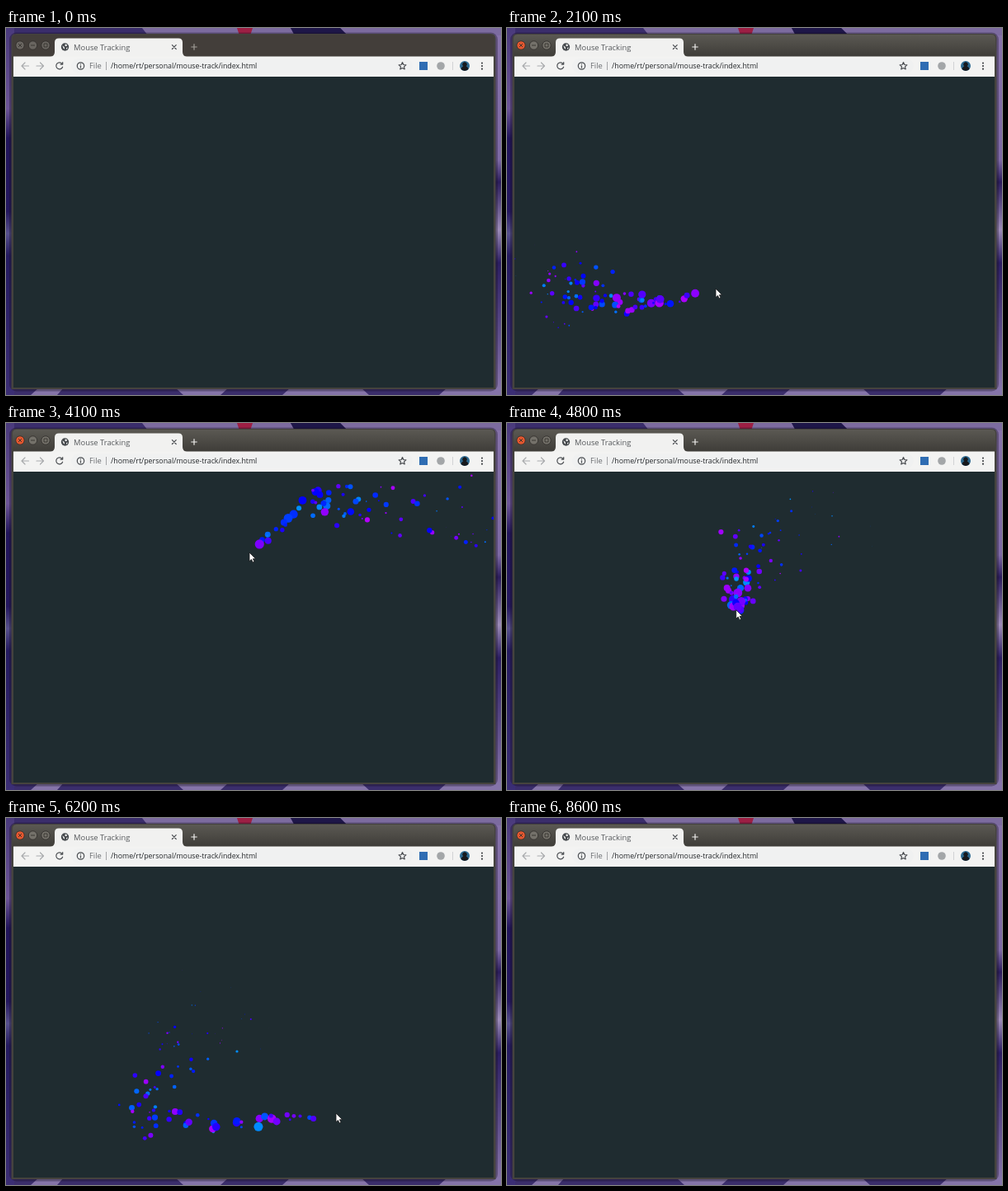
An HTML page for the animation above (8700 ms loop, 600x445 px).

```html
<!DOCTYPE html>
<html lang="en">
<head>
<meta charset="utf-8">
<title>Mouse Tracking</title>
<style>
  html, body { margin: 0; width: 100%; height: 100%; overflow: hidden; background: #3b2d69; }
  svg { display: block; width: 100vw; height: 100vh; }
  text { font-family: "Open Sans", "Noto Sans", sans-serif; }
  .icon { fill: none; stroke: #4b4e52; stroke-width: 1.2; stroke-linecap: round; stroke-linejoin: round; }
  .off { stroke: #a9abad; }
</style>
</head>
<body>
<svg viewBox="0 0 600 445">
  <defs>
    <linearGradient id="bar" x1="0" y1="0" x2="0" y2="1">
      <stop offset="0" stop-color="#5b5953"/>
      <stop offset="1" stop-color="#3e3c38"/>
    </linearGradient>
    <linearGradient id="left" x1="0" y1="0" x2="0" y2="1">
      <stop offset="0" stop-color="#4a3a7c"/>
      <stop offset=".22" stop-color="#6d5598"/>
      <stop offset=".3" stop-color="#21145b"/>
      <stop offset=".5" stop-color="#24175f"/>
      <stop offset=".56" stop-color="#57508d"/>
      <stop offset=".62" stop-color="#241a60"/>
      <stop offset="1" stop-color="#3b2e75"/>
    </linearGradient>
    <linearGradient id="right" x1="0" y1="0" x2="0" y2="1">
      <stop offset="0" stop-color="#8672a9"/>
      <stop offset=".36" stop-color="#7d69a4"/>
      <stop offset=".42" stop-color="#2b1c5c"/>
      <stop offset=".55" stop-color="#9c8bb8"/>
      <stop offset=".64" stop-color="#2b1d62"/>
      <stop offset="1" stop-color="#8a77ac"/>
    </linearGradient>
    <clipPath id="page"><rect x="9" y="59" width="582" height="377"/></clipPath>
  </defs>

  <!-- desktop -->
  <rect width="600" height="445" fill="#3a2d6b"/>
  <rect width="10" height="445" fill="url(#left)"/>
  <rect x="590" width="10" height="445" fill="url(#right)"/>
  <path d="M165 0H345L350 9H172ZM405 0H600V9H414Z" fill="#7c6b9f"/>
  <path d="M280 0H299L296 9H283Z" fill="#9d1f44"/>
  <path d="M345 0H405L414 9H350Z" fill="#1e1648"/>
  <path d="M30 445L40 436H70L62 445ZM205 436H270L260 445H215ZM345 436H430L440 445H335ZM535 436H600V445H525Z" fill="#8574a9"/>

  <!-- window -->
  <rect x="5.5" y="7" width="589" height="432" rx="7" fill="none" stroke="#14101f" stroke-opacity=".35" stroke-width="3"/>
  <path d="M6.5 438V13Q6.5 7 12.5 7H587.5Q593.5 7 593.5 13V438Z" fill="#45433e"/>
  <path id="title" d="M8 35V13Q8 8 13 8H587Q592 8 592 13V35Z"/>
  <g id="buttons" stroke="#2f2d2a" stroke-width=".8">
    <circle cx="17" cy="21" r="5.2"/>
    <circle cx="32.5" cy="21" r="5.2"/>
    <circle cx="48" cy="21" r="5.2"/>
  </g>
  <path d="M15 19l4 4m0-4l-4 4M30 21h5M46 19h4v4h-4z" fill="none" stroke="#34312d" stroke-width=".9"/>
  <path d="M54 35Q59 34 59 29V17.5Q59 12.5 64 12.5H209Q214 12.5 214 17.5V29Q214 34 219 35Z" fill="#f1f1f0"/>
  <circle cx="71.5" cy="23" r="4.7" fill="#45494d"/>
  <path d="M68.3 21.2l2.4 1.9 .4 2.7-1.6-1.2zM71.8 19.3l2.4 1.2-1 1.8-1.8-.6zM73 24l1.9-.4-1.4 2.6z" fill="#f1f1f0"/>
  <text x="82" y="26.5" font-size="9.4" fill="#55585b">Mouse Tracking</text>
  <path class="icon" d="M201.4 20.7l4.8 4.8m0-4.8l-4.8 4.8"/>
  <path id="plus" d="M224.3 23h7.4M228 19.3v7.4" stroke-width="1.2"/>

  <!-- toolbar -->
  <rect x="9" y="34.5" width="582" height="24.5" fill="#f3f3f2"/>
  <rect x="79" y="37" width="414" height="18" rx="9" fill="#f0f1f1"/>
  <path class="icon off" d="M27.5 46H19m4-4l-4 4 4 4M37 46h8.5m-4-4l4 4-4 4"/>
  <path class="icon" d="M68 43.4A4 4 0 1 0 68.6 47.2M68.7 41.5v2.6h-2.6"/>
  <circle class="icon" cx="90.5" cy="46" r="4.2"/>
  <path class="icon" d="M90.5 45.8v2.3M90.5 43.8v.1"/>
  <text x="101" y="49.3" font-size="9.4" fill="#696c70">File</text>
  <path d="M121.5 41v10" stroke="#a4a6a8"/>
  <text x="127" y="49.3" font-size="8.8" fill="#25282b">/home/rt/personal/mouse-track/index.html</text>
  <path class="icon" d="M480.5 41.6l1.3 2.9 3.1.3-2.4 2.1.7 3.1-2.7-1.6-2.7 1.6.7-3.1-2.4-2.1 3.1-.3z"/>
  <rect x="501" y="41" width="10" height="10" fill="#2f6db3"/>
  <circle cx="527" cy="46" r="4.8" fill="#a3a6a8"/>
  <path d="M541.5 41v10" stroke="#d2d3d4"/>
  <circle cx="556" cy="46" r="6" fill="#2c6990"/>
  <path d="M551.4 49.8Q552.5 46.8 554.3 46.2A2.7 2.7 0 1 1 557.7 46.2Q559.5 46.8 560.6 49.8A6 6 0 0 1 551.4 49.8Z" fill="#17191d"/>
  <path d="M577 42.6v.01m0 3.5v.01m0 3.5v.01" stroke="#45484b" stroke-width="2.2" stroke-linecap="round"/>

  <rect x="9" y="59" width="582" height="377" fill="#1f2c30"/>
  <g id="dots" clip-path="url(#page)"></g>
  <path id="cursor" d="M0 0V10.6L2.5 8.4L4.1 12L6 11.1L4.4 7.7H7.6Z" fill="#fff" stroke="#17191a" stroke-width=".8"/>
</svg>
<script>
const LOOP = 8700, STEP = 100, LIFE = 1060, GAP = 11, DELAY = 45, SPREAD = 56;
const $ = id => document.getElementById(id);

// key points of the two pointer strokes: [ms, x, y]
const strokes = [
  [[1080, 20, 316], [1500, 88, 321], [1950, 178, 332], [2100, 253, 316], [2250, 285, 292],
   [2400, 440, 195], [2750, 530, 92], [3000, 580, 78], [3100, 591, 95]],
  [[3230, 591, 112], [3600, 435, 102], [3880, 370, 100], [4100, 295, 157], [4700, 279, 222],
   [5150, 268, 235], [5500, 203, 291], [5700, 156, 354], [5800, 170, 370], [6200, 400, 358],
   [6380, 490, 320], [6580, 591, 318]]
];

// smooth curve through the key points, with speeds taken from the neighbours
function pointer(t) {
  const s = strokes.find(s => t >= s[0][0] && t < s.at(-1)[0]);
  if (!s) return null;
  const i = s.findIndex(p => p[0] > t);
  const a = s[i - 1], b = s[i], before = s[i - 2] || a, after = s[i + 1] || b;
  const span = b[0] - a[0], k = (t - a[0]) / span;
  const ease = k * k * (3 - 2 * k);
  return [1, 2].map(d => {
    const va = (b[d] - before[d]) / (b[0] - before[0]);
    const vb = (after[d] - a[d]) / (after[0] - a[0]);
    return a[d] + (b[d] - a[d]) * ease + span * k * (1 - k) * (va * (1 - k) - vb * k);
  });
}

function rand(i, k) {
  const v = Math.sin(i * 12.9898 + k * 78.233) * 43758.5453;
  return v - Math.floor(v);
}

const pool = Array.from({ length: Math.ceil(LIFE / GAP) + 1 }, () =>
  $("dots").appendChild(document.createElementNS("http://www.w3.org/2000/svg", "circle")));

function drawDot(dot, i, t) {
  const age = t - i * GAP, left = 1 - age / LIFE;
  const from = pointer(i * GAP);
  if (!from || age < DELAY || left <= 0) {
    dot.setAttribute("r", 0);
    return;
  }
  const drift = k => (rand(i, k) * 2 - 1) * SPREAD * age / 1000;
  dot.setAttribute("cx", from[0] + drift(1));
  dot.setAttribute("cy", from[1] + drift(2));
  dot.setAttribute("r", (1.3 + 5.2 * rand(i, 3)) * left ** 0.8);
  dot.setAttribute("fill", `hsl(${205 + 78 * rand(i, 4)} 100% 50%)`);
}

function draw(t) {
  const active = t >= 100;
  $("title").setAttribute("fill", active ? "url(#bar)" : "#433e3a");
  $("plus").setAttribute("stroke", active ? "#f0efed" : "#a19d97");
  [...$("buttons").children].forEach((b, i) =>
    b.setAttribute("fill", !active ? "#696560" : i ? "#74716a" : "#e4572f"));

  const first = Math.floor(t / GAP) - pool.length + 1;
  pool.forEach((dot, n) => drawDot(dot, first + n, t));

  const at = pointer(t);
  $("cursor").setAttribute("visibility", at ? "visible" : "hidden");
  if (at) $("cursor").setAttribute("transform", `translate(${at})`);
}

const start = performance.now();
function tick() {
  const t = Math.max(0, performance.now() - start) % LOOP;
  draw(Math.floor(t / STEP) * STEP);
  requestAnimationFrame(tick);
}
tick();
</script>
</body>
</html>
```
